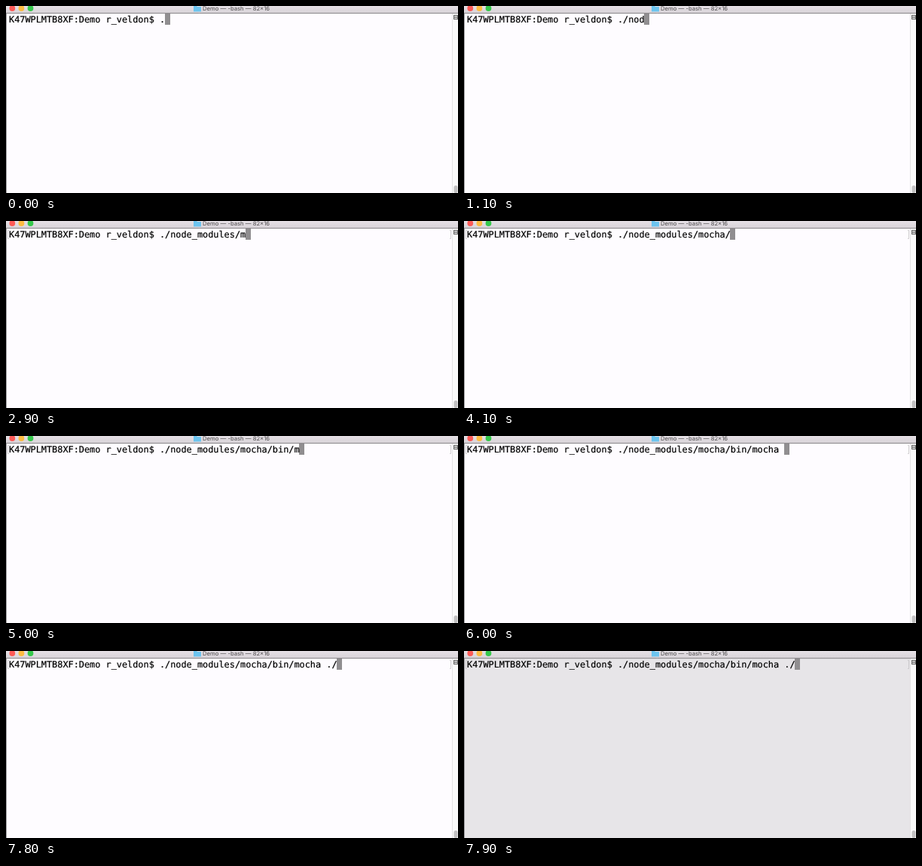
These frames come from a looping animation (600x249 px, 8 s). An HTML page:

```html
<!DOCTYPE html>
<html lang="en">
<head>
<meta charset="utf-8">
<title>Terminal typing</title>
<style>
  html, body { margin: 0; width: 100%; height: 100%; overflow: hidden; }
  svg { display: block; width: 600px; height: 249px; }
  text { text-rendering: geometricPrecision; white-space: pre; }
  #line { font: 11.86px "DejaVu Sans Mono", monospace; stroke: #000; stroke-width: .2; }
  #title { font: 7.7px Inter, sans-serif; fill: #4c4a4c; }
</style>
</head>
<body>
<svg viewBox="0 0 600 249">
  <defs>
    <linearGradient id="bar" x2="0" y2="1">
      <stop stop-color="#e6e1e6"/>
      <stop offset="1" stop-color="#d6d1d6"/>
    </linearGradient>
  </defs>

  <rect id="page" width="600" height="249"/>
  <rect id="cursor" y="10" width="7" height="15" fill="#908e90"/>
  <path id="marks" d="M4 12.5H2.5V23.5H4M589 12.5H590.5V23.5H589" fill="none" stroke="#c4c2c4" stroke-width=".8"/>
  <text id="line" x="4" y="22"></text>

  <!-- scroll bar -->
  <rect x="592" y="10" width="8" height="239" fill="#fafafa"/>
  <path d="M592.5 10V249" stroke="#e4e3e4"/>
  <rect x="594.5" y="12.5" width="5" height="5" fill="#ddd" stroke="#666"/>
  <path d="M595 15H599" stroke="#555"/>
  <rect x="594.5" y="239" width="5" height="10" rx="2.5" fill="#c1c0c1"/>

  <!-- title bar -->
  <rect width="600" height="10" fill="url(#bar)"/>
  <path d="M0 9.7H600" stroke="#7c7a7c" stroke-width=".9"/>
  <path d="M.4 10V249" stroke="#77757a" stroke-width=".8"/>
  <circle cx="8.3" cy="3" r="3.9" fill="#fc5b57"/>
  <circle cx="20.4" cy="3" r="3.9" fill="#fdbc40"/>
  <circle cx="32.5" cy="3" r="3.9" fill="#34c84a"/>
  <path d="M249 0H253L254 1H259V7.5H249Z" fill="#6cc4ee"/>
  <text id="title" x="261" y="6">Demo — -bash — 82×16</text>
</svg>

<script>
const LOOP = 8000, STEP = 100;        // the screen refreshes once per step
const KEY = 50, TAB_DELAY = 200;      // typing pace, pause before completion
const ADVANCE = 7.14;                 // width of one character
const MARKS_AT = 1200, BELL_AT = 7900;
const PROMPT = 'K47WPLMTB8XF:Demo r_veldon$ ';

// Each burst is typed key by key, then the shell fills in the rest.
const BURSTS = [
  { at: 0, typed: './' },
  { at: 1000, typed: 'node', filled: '_modules/' },
  { at: 2900, typed: 'moc', filled: 'ha/' },
  { at: 4200, typed: 'bin', filled: '/' },
  { at: 5000, typed: 'mo', filled: 'cha ' },
  { at: 6600, typed: './' }
];

const [page, cursor, marks, line] =
  ['page', 'cursor', 'marks', 'line'].map(id => document.getElementById(id));

function burstText({ at, typed, filled = '' }, t) {
  if (t < at) return '';
  const keys = Math.floor((t - at) / KEY) + 1;
  const complete = t >= at + typed.length * KEY + TAB_DELAY;
  return typed.slice(0, keys) + (complete ? filled : '');
}

function draw(now) {
  const t = Math.floor(now % LOOP / STEP) * STEP;
  const text = PROMPT + BURSTS.map(burst => burstText(burst, t)).join('');
  line.textContent = text;
  cursor.setAttribute('x', Math.floor(4 + text.length * ADVANCE));
  marks.setAttribute('visibility', t >= MARKS_AT ? 'visible' : 'hidden');
  page.setAttribute('fill', t >= BELL_AT ? '#e7e5e8' : '#fefcff');
}

const start = performance.now();
function tick() {
  draw(performance.now() - start);
  requestAnimationFrame(tick);
}
tick();
</script>
</body>
</html>
```
